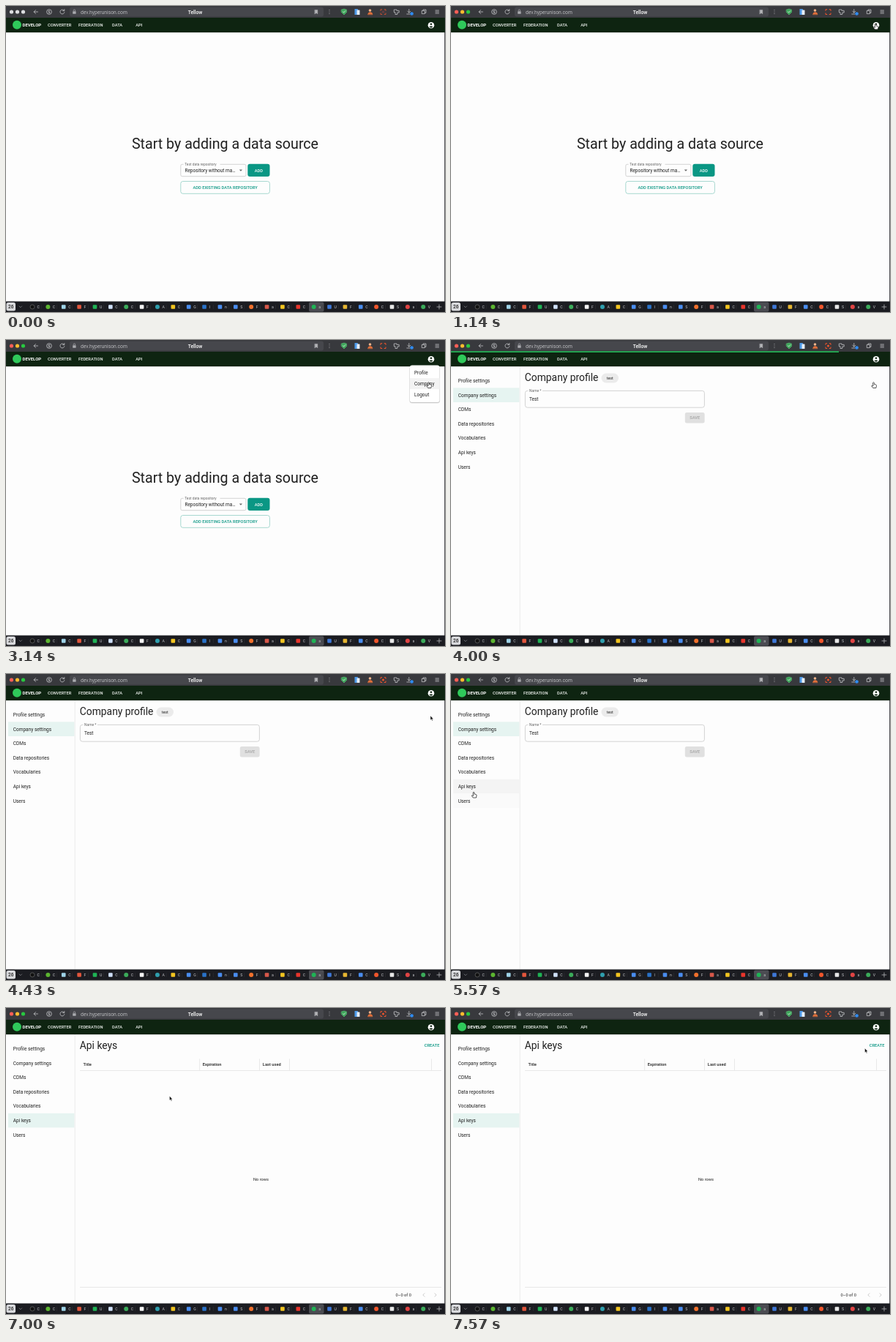
An HTML page that plays this animation: 600x418 px, repeating every 8 s.

```html
<!DOCTYPE html>
<html lang="en">
<head>
<meta charset="utf-8">
<title>Company settings</title>
<style>
  html, body { margin: 0; width: 100%; height: 100%; overflow: hidden; background: #fdfdfd; }
  svg { display: block; width: 100%; height: 100%; }
  text { font-family: Roboto, sans-serif; white-space: pre; }
</style>
</head>
<body>
<svg id="stage" viewBox="0 0 600 418"></svg>
<script>
const TEAL = '#0a9784', INK = '#202020', SELECTED = '#e6f4f1';
const BODY = 6.5, SMALL = 5.73;

const rect = (x, y, w, h, fill, r = 0, more = '') =>
  `<rect x="${x}" y="${y}" width="${w}" height="${h}" rx="${r}" fill="${fill}" ${more}/>`;
const frame = (x, y, w, h, color, r, id = '') =>
  rect(x, y, w, h, 'none', r, `stroke="${color}" stroke-width=".7" ${id && `id="${id}"`}`);
const dot = (x, y, r, fill, more = '') => `<circle cx="${x}" cy="${y}" r="${r}" fill="${fill}" ${more}/>`;
const text = (x, y, size, str, fill = INK, weight = 400, anchor = 'start', more = '') =>
  `<text x="${x}" y="${y}" font-size="${size}" fill="${fill}" font-weight="${weight}" text-anchor="${anchor}" ${more}>${str}</text>`;
const line = (d, color, width = .7, fill = 'none') =>
  `<path d="${d}" fill="${fill}" stroke="${color}" stroke-width="${width}" stroke-linecap="round" stroke-linejoin="round"/>`;
const group = (id, ...parts) => `<g id="${id}">${parts.join('')}</g>`;

function browserBar() {
  const c = '#d6d7da';
  return rect(0, 0, 600, 16, '#38393d') + rect(87, 1.5, 347, 13, '#46474c', 3) +
    group('lights', ...['#ff5f57', '#febc2e', '#28c840'].map((f, i) => dot(7.5 + 8 * i, 8, 2.6, f))) +
    line('M43.5 8H38.2M40.5 5.6L38.2 8L40.5 10.4', c) +
    dot(59, 8, 3.4, 'none', `stroke="${c}" stroke-width=".7"`) + text(59, 10, 5.4, 'S', c, 500, 'middle') +
    line('M79.4 6.2A3 3 0 1 0 79.9 8.6M79.8 4.5V6.6H77.7', c) +
    rect(91.2, 7.2, 4.4, 3.6, '#a9aaae', .6) + line('M92.2 7V6A1.2 1.2 0 0 1 94.6 6V7', '#a9aaae') +
    text(102, 10.5, 6.75, 'dev.hyperunison.com', '#b9babd') +
    text(258.5, 10.5, 6.75, 'Tellow', '#fff', 500, 'middle') +
    line('M422.2 5.4H425.8V10.8L424 9.4L422.2 10.8Z', '#b4b5b8', .5, '#b4b5b8') +
    [5.5, 8, 10.5].map(y => dot(442, y, .6, '#a5a6aa')).join('') +
    line('M458.5 5L462 4L465.5 5V8.5L462 12L458.5 8.5Z', '#5fbf77', .6, '#3da65a') +
    line('M460.4 7.8L461.7 9L463.8 6.6', '#fff') +
    rect(476.5, 4, 4.5, 8, '#4e9bea', .6) + rect(479.5, 5.4, 4, 6.6, '#e6edf5', .6) +
    dot(497.5, 6, 1.8, '#f0b48a') + line('M494.5 11.5Q495 8.3 498 8.5Q501 8.8 501 11.5Z', '#e2703a', .5, '#e2703a') +
    group('recorder', line('M512 6.4V4.7H513.8M517.2 4.7H519V6.4M519 9.8V11.5H517.2M513.8 11.5H512V9.8', '#f2552c', 1),
      `<g id="recDot">${dot(515.5, 8.1, 1.5, '#f2552c')}</g>`,
      `<g id="recCross">${line('M514 6.6L517 9.6M517 6.6L514 9.6', '#c24a4a')}</g>`) +
    line('M530.7 5H534V6.3H537.2V9H534.8V11.5H532V8.6H530.7Z', c) +
    line('M550.8 4.5V9M548.8 7.2L550.8 9.2L552.8 7.2M547.8 11H552', c) + dot(554.6, 10.5, 2.3, '#2f8bf0') +
    line('M568.7 6.4H572.3V10.6H568.7ZM570 6V5H574V9.4H572.7', c) +
    line('M587 6H591.5M587 8H591.5M587 10H591.5', c);
}

function appBar() {
  return rect(0, 36, 600, 1, '#00000022') + rect(0, 16, 600, 20, '#0e2411') + dot(15, 25.7, 6, '#2fc95a') +
    text(22.5, 27.5, 6, 'DEVELOP', '#fff', 700) +
    [[57, 'CONVERTER'], [99, 'FEDERATION'], [145, 'DATA'], [177.3, 'API']]
      .map(([x, s]) => text(x, 28.3, SMALL, s, '#f2f5f2', 500)).join('') +
    dot(581, 26.2, 6, '#fff', 'id="iconRipple" opacity="0"') +
    dot(581, 26.2, 4.3, '#fff') + dot(581, 24.8, 1.3, '#0e2411') +
    line('M578.7 28.5Q581 26.4 583.3 28.5Q581 30.4 578.7 28.5Z', '#0e2411', .2, '#0e2411') +
    rect(0, 15.3, 0, 1.7, '#22b455', 0, 'id="progress"');
}

function tabBar() {
  const colors = ('#111 #5cb531 #9fd3e8 #e2563c #1fb455 #cfe0fa #3bab5a #f4f4f4 #2f9fae #f3c520 #4a8df0 #2a72c8 #4a8df0 ' +
    '#4a8df0 #f0702c #d8584a #f3c520 #e8352c #1fb455 #3f78d8 #e6b632 #4a8df0 #f0562c #e8e8e8 #e04444 #3bab5a').split(' ');
  const round = '01000010100000100010001011', letters = 'CCCFUCCFACGInSFaCCaUFCCSaVC';
  let out = rect(0, 403.5, 600, 14.5, '#1b1c21') + rect(414, 404.5, 20.5, 13, '#4b4c52', 2) +
    rect(.5, 405, 12.5, 11.5, '#d8d9dc', 2.5) + text(6.7, 413, 6.4, '26', '#222', 500, 'middle') +
    line('M18 410L19.8 411.8L21.6 410', '#a0a1a6', .6) + line('M589 411H595M592 408V414', '#c8c9cc');
  colors.forEach((color, i) => {
    const x = 36 + i * 21.37;
    out += (round[i] === '1' || !i ? dot(x, 411, 3, color, i ? '' : 'stroke="#777" stroke-width=".6"')
      : rect(x - 2.8, 408.2, 5.6, 5.6, color, 1)) +
      text(x + 6.5, 413, 5.2, letters[i], '#c4c5c9') +
      (i ? rect(x - 9.5, 408, .4, 6, '#3a3b40') : '');
  });
  return out;
}

function home() {
  return text(299.5, 194.5, 19.64, 'Start by adding a data source', INK, 400, 'middle') +
    frame(238.8, 216.3, 89.2, 16.4, '#c2c2c2', 2) + rect(242.5, 215, 50, 3, '#fdfdfd') +
    text(244.2, 217.8, 4.9, 'Test data repository', '#666') +
    text(244.4, 226.7, BODY, 'Repository without ma…') +
    `<path d="M318.8 223.6H323L320.9 225.8Z" fill="#666"/>` +
    rect(330.3, 215.8, 30.2, 17.2, TEAL, 3) + text(345.4, 226.5, SMALL, 'ADD', '#fff', 500, 'middle') +
    frame(238.8, 239.5, 121.6, 16.8, '#84c9be', 3) +
    text(299.6, 250, SMALL, 'ADD EXISTING DATA REPOSITORY', TEAL, 500, 'middle');
}

const rows = ['Profile settings', 'Company settings', 'CDMs', 'Data repositories', 'Vocabularies', 'Api keys', 'Users'];
const rowTop = i => 45.8 + 19.6 * i;

function sidebar() {
  return rows.map((name, i) => rect(3, rowTop(i), 90.3, 19.6, 'none', 0, `id="row${i}"`) +
    text(9.8, rowTop(i) + 12.1, BODY, name)).join('') + rect(93.8, 36, .6, 367.5, '#dedede');
}

function company() {
  return text(100.8, 55.8, 13.85, 'Company profile') +
    rect(205.5, 45.5, 23.5, 13, '#ebebeb', 6.5) + text(217.2, 53.8, 5.3, 'test', INK, 400, 'middle') +
    frame(101.4, 69.4, 245, 22.8, '#c2c2c2', 3, 'field') + rect(105.5, 68, 19.5, 3, '#fdfdfd') +
    text(107, 71.3, 4.9, 'Name *', '#666') + text(107, 83.2, BODY, 'Test', INK, 400, 'start', 'id="name"') +
    rect(319.8, 99, 26.8, 14.4, '#e0e0e0', 2.5) + text(333.2, 108.3, SMALL, 'SAVE', '#a4a4a4', 500, 'middle');
}

function apiKeys() {
  return text(100.8, 55.8, 13.85, 'Api keys') + text(592.5, 53.3, SMALL, 'CREATE', TEAL, 500, 'end') +
    [[105.5, 'Title'], [268.8, 'Expiration'], [350.8, 'Last used']]
      .map(([x, s]) => text(x, 79.4, SMALL, s, INK, 500)).join('') +
    [264.5, 346.3, 387.3, 581.2].map(x => rect(x, 69.5, .6, 15.5, '#dcdcdc')).join('') +
    rect(101, 85, 494, .7, '#e0e0e0') + rect(101, 381, 494, .7, '#e0e0e0') +
    text(348.5, 235.5, SMALL, 'No rows', INK, 400, 'middle') + text(532.5, 394.4, SMALL, '0–0 of 0') +
    line('M572 389.8L569.8 392L572 394.2M586 389.8L588.2 392L586 394.2', '#b8b8b8');
}

function menu() {
  return rect(551.3, 35.8, 42, 51, '#00000010', 4) + rect(551.6, 35.3, 41.4, 50.7, '#00000028', 3.5) +
    rect(552, 34.5, 40.5, 50.5, '#fff', 3) + rect(552, 37.2, 40.5, 15, '#f3f3f3', 0, 'id="hover"') +
    ['Profile', 'Company', 'Logout'].map((s, i) => text(558, 47 + 14.8 * i, BODY, s)).join('');
}

const cursors = group('arrow', line('M0 0V6L1.4 4.8L2.4 7L3.4 6.5L2.4 4.4H4.2Z', '#fff', .5, '#111')) +
  group('hand', line('M-.8 .8Q0 -.5 .8 .8V3L3 3.4Q4.2 3.8 4 5L3.4 8H-.8L-2.8 5.2Q-2.7 4.2 -.8 5.2Z', '#111', .7, '#fff')) +
  group('beam', line('M-1.2 -3.4Q0 -3.4 0 -2.4Q0 -3.4 1.2 -3.4M0 -2.4V2.6M-1.2 3.6Q0 3.6 0 2.6Q0 3.6 1.2 3.6', '#222', .6));

stage.innerHTML = rect(0, 0, 600, 418, '#fdfdfd') + group('home', home()) + group('sidebar', sidebar()) +
  group('company', company()) + group('apiKeys', apiKeys()) + rect(599.2, 36, .8, 368, '#333438') +
  browserBar() + appBar() + tabBar() + group('menu', menu()) + group('cursor', cursors);

const $ = id => document.getElementById(id);
const set = (id, attr, value) => $(id).setAttribute(attr, value);
const show = (id, on) => set(id, 'opacity', Number(on));

// Pointer stops: tick, x, y; each leg eases out
const stops = [[3, 420, 190], [8, 580, 24], [14, 580, 24], [22, 577.5, 57.5], [30, 577.5, 57.5], [31, 580, 57],
  [32, 300, 82], [33, 215, 80], [34, 215, 80], [36, 70, 160], [37, 44, 174], [38, 33, 170], [39, 31, 161],
  [40, 31, 157], [48, 31, 157], [53, 565.5, 55], [56, 565.5, 55]];

function pointer(n) {
  const i = Math.max(1, stops.findIndex(s => s[0] >= n));
  const [a, x0, y0] = stops[i - 1], [b, x1, y1] = stops[i];
  const k = 1 - (1 - (n - a) / (b - a)) ** 2;
  return [x0 + (x1 - x0) * k, y0 + (y1 - y0) * k];
}

function draw(n) {
  const page = n < 27 ? 'home' : n < 44 ? 'company' : 'apiKeys';
  for (const id of ['home', 'company', 'apiKeys']) show(id, id === page);
  show('sidebar', page !== 'home');

  const [x, y] = pointer(n);
  const inField = n >= 32 && n < 35;
  const shape = inField ? 'beam' : (n >= 8 && n < 29) || (n >= 36 && n < 49) ? 'hand' : 'arrow';
  for (const id of ['arrow', 'hand', 'beam']) show(id, id === shape);
  set('cursor', 'transform', `translate(${x} ${y})`);
  show('cursor', n >= 4);

  [...$('lights').children].forEach((c, i) =>
    c.setAttribute('fill', n < 4 ? '#dcdde0' : ['#ff5f57', '#febc2e', '#28c840'][i]));
  set('recorder', 'opacity', n < 4 ? .75 : 1);
  show('recCross', n < 4);
  show('recDot', n >= 27);

  set('iconRipple', 'opacity', n === 10 || n === 11 ? .3 : 0);
  set('menu', 'opacity', n === 12 ? .6 : n > 12 && n < 26 ? 1 : n === 26 ? .4 : 0);
  set('hover', 'y', y > 52 ? 52.2 : 37.2);
  set('hover', 'fill', n === 25 ? '#dfdfdf' : '#f3f3f3');

  const selected = n < 43 ? 1 : 5;
  rows.forEach((_, i) => {
    const over = x < 93 && y >= rowTop(i) && y < rowTop(i + 1);
    const pressed = i === 5 && n >= 42 && n < 47;
    set('row' + i, 'fill', pressed ? '#cfe7e2' : i === selected ? SELECTED : over ? '#f4f4f4'
      : i === 6 && n === 39 ? '#fafafa' : 'none');
  });
  set('field', 'stroke', inField ? '#222' : '#c2c2c2');
  show('name', n >= 28);

  const step = n < 40 ? n - 27 : n - 44;
  set('progress', 'width', [300, 530, 600][step] || 0);
  set('progress', 'opacity', step === 2 ? .5 : 1);
}

// Seven ticks per second, 56 ticks per loop
const start = performance.now();
function tick() {
  draw(Math.floor((performance.now() - start + 5) * 7 / 1000) % 56);
  requestAnimationFrame(tick);
}
tick();
</script>
</body>
</html>
```
